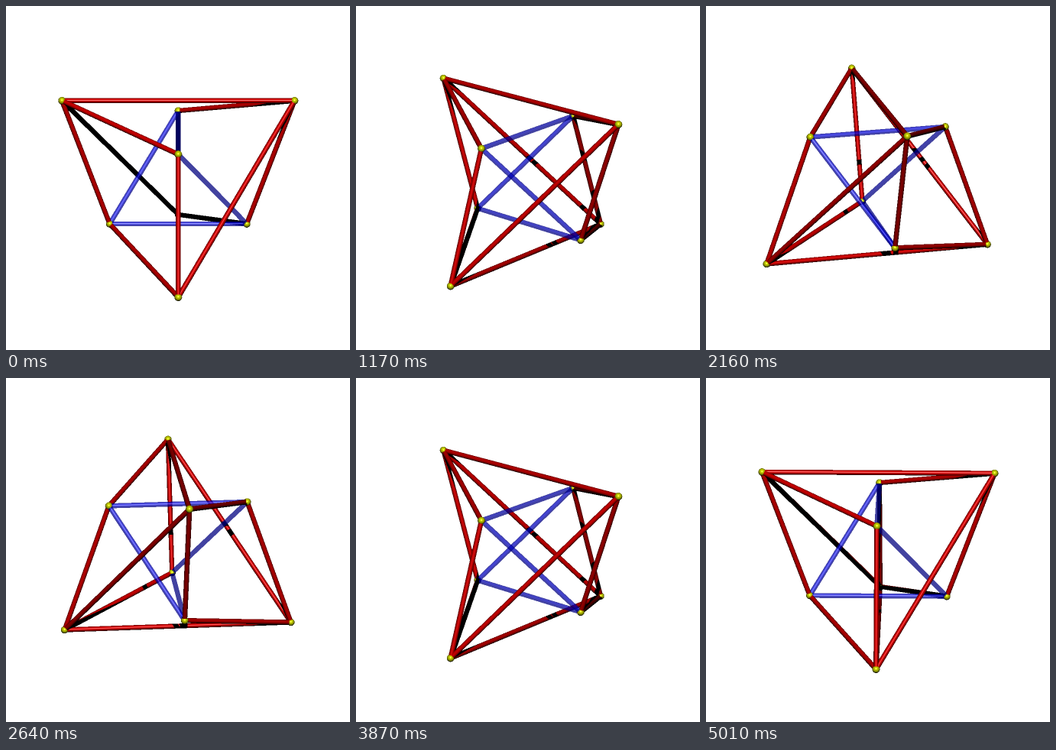
An HTML page with a canvas for the animation above (5.04 s loop, 450 px wide and 450 px high).

```html
<!DOCTYPE html>
<html>
<head>
<meta charset="utf-8">
<style>
html, body { margin: 0; width: 450px; height: 450px; overflow: hidden; background: #fff; }
canvas { display: block; width: 450px; height: 450px; }
</style>
</head>
<body>
<canvas id="stage" width="900" height="900"></canvas>
<script>
const SCALE = 2, N = 450 * SCALE;
const ctx = document.getElementById('stage').getContext('2d');
const image = ctx.createImageData(N, N), px = image.data;
const depth = new Float32Array(N * N);

// Two regular tetrahedra, the inner one flipped and 0.6 times as large
const SIZE = 150.4, INNER = 0.6, DIST = 3055;
const corners = [
  [-1, 0, 1], [1, 0, 1], [0, 1, -1], [0, -1, -1],
  [0, 1, 1], [0, -1, 1], [-1, 0, -1], [1, 0, -1]
].map(([x, y, z], i) => {
  const s = SIZE * (i < 4 ? 1 : INNER);
  return [x * s, y * s, z * s * Math.SQRT1_2];
});
const pairs = text => text.split(' ').map(p => [+p[0], +p[1]]);
const redEdges = pairs('01 12 23 30 04 06 15 17 24 26 35 37');
const blueEdges = pairs('45 56 67 74');

const RED = [205, 0, 0], YELLOW = [208, 218, 0], BLUE = [0, 0, 210];
const ROD = 3.2, BALL = 4.8, OPACITY = 0.74;

// Camera elevation, and the light's extra elevation above it
const elev = 19.4 * Math.PI / 180, tilt = 15.9 * Math.PI / 180;
const ce = Math.cos(elev), se = Math.sin(elev);
const cl = Math.cos(tilt), sl = Math.sin(tilt);
const ch = Math.cos(tilt / 2), sh = Math.sin(tilt / 2);
const clamp = (v, lo, hi) => Math.max(lo, Math.min(hi, v));

function view([x, y, z], angle) {
  const c = Math.cos(angle), s = Math.sin(angle);
  const X = x * c - y * s, D = x * s + y * c;
  const Y = z * ce - D * se, Z = z * se + D * ce, q = 1 - Z / DIST;
  return {
    X, Y, Z, q,
    sx: (225.3 + X / q) * SCALE, sy: (225.3 - Y / q) * SCALE,
    u: X, v: Y * cl - Z * sl, w: Y * sl + Z * cl
  };
}

// A ball is a rod of no length
function makePart(a, b, r, color) {
  const dX = b.X - a.X, dY = b.Y - a.Y, dZ = b.Z - a.Z;
  const len = Math.hypot(dX, dY, dZ) || 1;
  const k = dZ / len, m = Math.sqrt(1 - k * k) || 1;
  const du = b.u - a.u, dv = b.v - a.v;
  return {
    a, b, r, color, dX, dY, dZ,
    face: [-k * dX / len / m, -k * dY / len / m, (1 - k * k) / m],
    du, dv, dw: b.w - a.w, l2: du * du + dv * dv || 1
  };
}

function inShadow(parts, self, X, Y, Z) {
  const v = Y * cl - Z * sl, w = Y * sl + Z * cl;
  for (const p of parts) {
    if (p === self) continue;
    const ou = X - p.a.u, ov = v - p.a.v;
    const t = clamp((ou * p.du + ov * p.dv) / p.l2, 0, 1);
    const eu = ou - t * p.du, ev = ov - t * p.dv;
    if (eu * eu + ev * ev < p.r * p.r && p.a.w + t * p.dw > w + 0.5) return true;
  }
  return false;
}

function drawPart(part, parts) {
  const { a, b, r, color, face } = part, clear = color === BLUE;
  const dx = b.sx - a.sx, dy = b.sy - a.sy, l2 = dx * dx + dy * dy || 1;
  const pad = r * SCALE / Math.min(a.q, b.q);
  const slope = dy || 1e-6, half = pad * (Math.sqrt(l2) + 1) / Math.abs(slope);
  const left = Math.min(a.sx, b.sx) - pad, right = Math.max(a.sx, b.sx) + pad;
  const bottom = Math.max(a.sy, b.sy) + pad;

  for (let y = Math.floor(Math.min(a.sy, b.sy) - pad); y <= bottom; y++) {
    const oy = y + 0.5 - a.sy, mid = a.sx + oy * dx / slope;
    const end = Math.min(right, mid + half);
    for (let x = Math.floor(Math.max(left, mid - half)); x <= end; x++) {
      const ox = x + 0.5 - a.sx;
      const s = clamp((ox * dx + oy * dy) / l2, 0, 1);
      const t = s * a.q / (b.q + s * (a.q - b.q));
      const R = r * SCALE / (a.q + t * (b.q - a.q));
      const ex = (ox - s * dx) / R, ey = (s * dy - oy) / R;
      const e2 = ex * ex + ey * ey;
      if (e2 > 1) continue;

      const f = Math.sqrt(1 - e2);
      const nx = ex + f * face[0], ny = ey + f * face[1], nz = f * face[2];
      const Z = a.Z + t * part.dZ + r * nz, at = y * N + x;
      if (Z < depth[at]) continue;

      let light = Math.max(0, ny * sl + nz * cl);
      let shine = 150 * Math.pow(Math.max(0, ny * sh + nz * ch), 80);
      if (clear) {
        light = Math.max(light, 0.6);
      } else {
        depth[at] = Z;
        const X = a.X + t * part.dX + r * nx, Y = a.Y + t * part.dY + r * ny;
        if (!light || inShadow(parts, part, X, Y, Z)) light = shine = 0;
      }
      for (let c = 0; c < 3; c++) {
        const i = at * 4 + c, value = color[c] * light + shine;
        px[i] = clear ? OPACITY * value + (1 - OPACITY) * px[i] : value;
      }
    }
  }
}

function draw(angle) {
  const pts = corners.map(p => view(p, angle));
  const rods = (edges, color) => edges.map(([i, j]) => makePart(pts[i], pts[j], ROD, color));
  const solid = [...rods(redEdges, RED), ...pts.map(p => makePart(p, p, BALL, YELLOW))];
  const glass = rods(blueEdges, BLUE).sort((p, q) => p.a.Z + p.b.Z - q.a.Z - q.b.Z);
  const parts = [...solid, ...glass];
  px.fill(255);
  depth.fill(-1e9);
  for (const p of parts) drawPart(p, parts);
  ctx.putImageData(image, 0, 0);
}

// Turn one way at a steady rate, then back
const STEP = 30, STEPS = 168, TURN = Math.PI / 2 / 85;
let start, last = -1;
function tick(now) {
  start ??= now;
  const k = Math.floor((now - start) / STEP) % STEPS;
  if (k !== last) draw(Math.min(k, STEPS - k) * TURN);
  last = k;
  requestAnimationFrame(tick);
}
requestAnimationFrame(tick);
</script>
</body>
</html>
```
